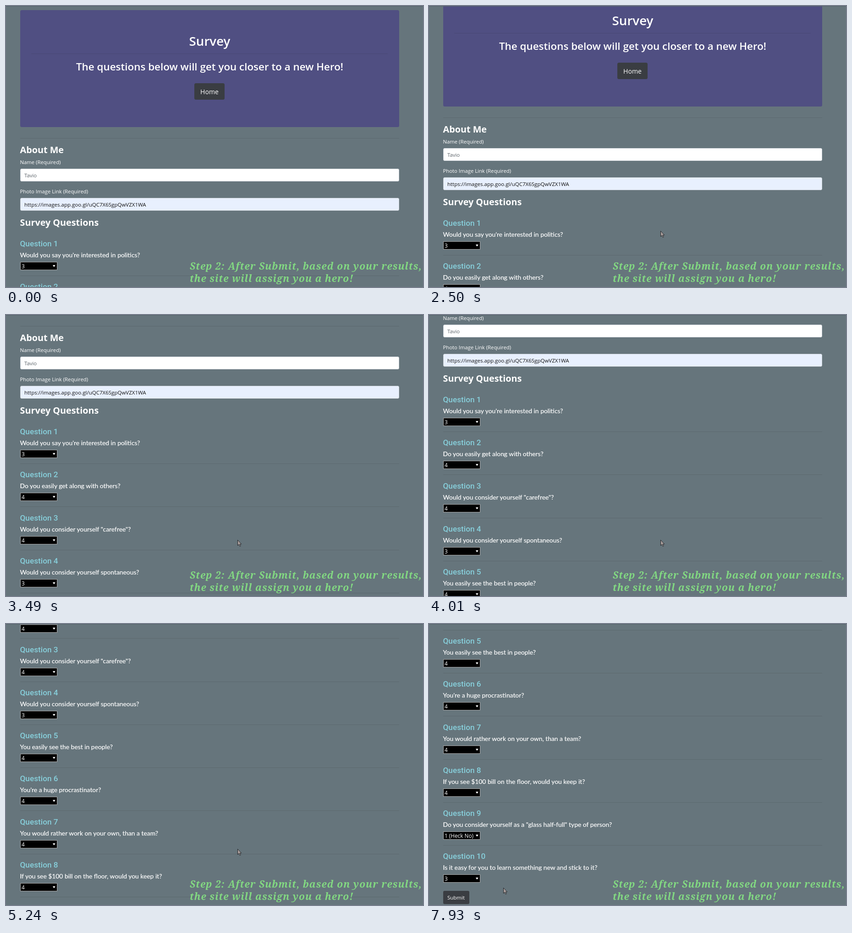
Write an HTML page that moves like this. It is 910 by 615 pixels and loops after 7.99 s.

```html
<!DOCTYPE html>
<html lang="en">
<head>
<meta charset="utf-8">
<title>Survey</title>
<style>
  html, body { margin: 0; width: 100%; height: 100%; overflow: hidden; background: #66757c; }
  svg { display: block; width: 910px; height: 615px; font-family: "Open Sans", "Noto Sans", sans-serif; font-size: 11.4px; fill: #fff; }
  .title { font-size: 27.7px; font-weight: 600; }
  .lead { font-size: 22.4px; font-weight: 600; }
  .section { font-size: 19.8px; font-weight: 700; }
  .label { font-size: 11.3px; }
  .heading { font: 500 17.2px Roboto, sans-serif; fill: #87cfdb; }
  .prompt { font: 13.87px Lato, sans-serif; stroke: #fff; stroke-width: .2; }
  .value { font-size: 11.8px; }
  .rule { fill: #000; fill-opacity: .1; }
  .button { fill: #3a3d42; }
  .field { fill: #fff; stroke: #ced4da; }
  .autofill { fill: #e8f0fe; }
  .select { fill: #000; stroke: #a9a9a9; }
  .caption { font: italic 700 21px "Noto Serif", serif; letter-spacing: 1px; fill: #82d882; }
  .middle { text-anchor: middle; }
</style>
</head>
<body>
<svg viewBox="0 0 910 615">
  <g id="page">
    <rect x="31" y="9" width="827" height="256" rx="3.5" fill="#504f82"/>
    <text class="title middle" x="444.5" y="87">Survey</text>
    <rect class="rule" x="55" y="104" width="778" height="1"/>
    <text class="lead middle" x="444.5" y="141">The questions below will get you closer to a new Hero!</text>
    <rect class="button" x="411" y="169" width="66" height="36" rx="3.5"/>
    <text class="middle" x="444" y="193" font-size="14.1">Home</text>

    <rect class="rule" x="31" y="289" width="827" height="1"/>
    <text class="section" x="30.5" y="322">About Me</text>
    <text class="label" x="30.5" y="346">Name (Required)</text>
    <rect class="field" x="31.5" y="356.5" width="826" height="27" rx="2.5"/>
    <text x="40" y="375" fill="#5c6369">Tavio</text>
    <text class="label" x="30.5" y="410">Photo Image Link (Required)</text>
    <rect class="field autofill" x="31.5" y="420.5" width="826" height="27" rx="2.5"/>
    <text x="40" y="439" font-size="11.5" fill="#111">https://images.app.goo.gl/uQC7X6SgpQwVZX1WA</text>
    <text class="section" x="30.5" y="481">Survey Questions</text>

    <g id="questions"></g>

    <rect class="button" x="31" y="1444" width="57" height="29" rx="3"/>
    <text class="middle" x="59" y="1463" font-size="11.5">Submit</text>
  </g>
  <rect width="910" height="1" fill="#54626a"/>
  <text class="caption" x="401" y="577">Step 2: After Submit, based on your results,</text>
  <text class="caption" x="401" y="604">the site will assign you a hero!</text>
  <path id="cursor" d="M.5.5V12.5L3.2 10 5.2 14.4 7.1 13.5 5.2 9.3H8.7Z" fill="#a89c9a" stroke="#22262a"/>
</svg>
<script>
const LOOP = 7990;
const QUESTION_PITCH = 94.25;

const questions = [
  ["Would you say you're interested in politics?", "3"],
  ["Do you easily get along with others?", "4"],
  ['Would you consider yourself "carefree"?', "4"],
  ["Would you consider yourself spontaneous?", "3"],
  ["You easily see the best in people?", "4"],
  ["You're a huge procrastinator?", "4"],
  ["You would rather work on your own, than a team?", "4"],
  ["If you see $100 bill on the floor, would you keep it?", "4"],
  ['Do you consider yourself as a "glass half-full" type of person?', "1 (Heck No)"],
  ["Is it easy for you to learn something new and stick to it?", "3"]
];

document.getElementById("questions").innerHTML = questions.map(([prompt, value], i) => `
  <g transform="translate(0 ${Math.round(QUESTION_PITCH * i)})">
    <text class="heading" x="30.5" y="526">Question ${i + 1}</text>
    <text class="prompt" x="30.5" y="550">${prompt}</text>
    <rect class="select" x="31.5" y="560.5" width="80" height="17"/>
    <text class="value" x="34" y="574">${value}</text>
    <path d="M102 567h5.6l-2.8 4.6z"/>
    ${i < questions.length - 1 ? '<rect class="rule" x="31" y="590" width="827" height="1"/>' : ""}
  </g>`).join("");

// Each move: first step, last step (ms), step count, end point, ease-out power.
const scrollMoves = [
  [2360, 2920, 13, [139], 1.064],
  [3270, 3720, 9, [296], 2],
  [3920, 4290, 8, [408], 1.5],
  [4580, 4950, 9, [590], 1.5],
  [5170, 5480, 7, [750], 1.5],
  [5780, 5920, 4, [860], 1.2]
];
const cursorMoves = [
  [190, 500, 8, [730, 577], 1.3],
  [830, 1070, 6, [669, 552], 1.3],
  [1440, 1800, 8, [505, 492], 1.3],
  [6660, 6820, 5, [386, 492], 1.3],
  [7110, 7300, 5, [246, 534], 1.3],
  [7530, 7930, 10, [162, 577], 1.3]
];

function follow(start, moves, time) {
  let point = start;
  for (const [first, last, count, end, power] of moves) {
    if (time < first) break;
    const step = Math.floor((time - first) / (last - first) * (count - 1) + 0.1) + 1;
    const eased = 1 - (1 - Math.min(step / count, 1)) ** power;
    point = point.map((from, i) => from + (end[i] - from) * eased);
  }
  return point.map(Math.round);
}

const page = document.getElementById("page");
const cursor = document.getElementById("cursor");

function draw() {
  const time = performance.now() % LOOP;
  const [scroll] = follow([0], scrollMoves, time);
  const [x, y] = follow([812, 617], cursorMoves, time);
  page.setAttribute("transform", `translate(0 ${-scroll})`);
  cursor.setAttribute("transform", `translate(${x} ${y})`);
  requestAnimationFrame(draw);
}
draw();
</script>
</body>
</html>
```
